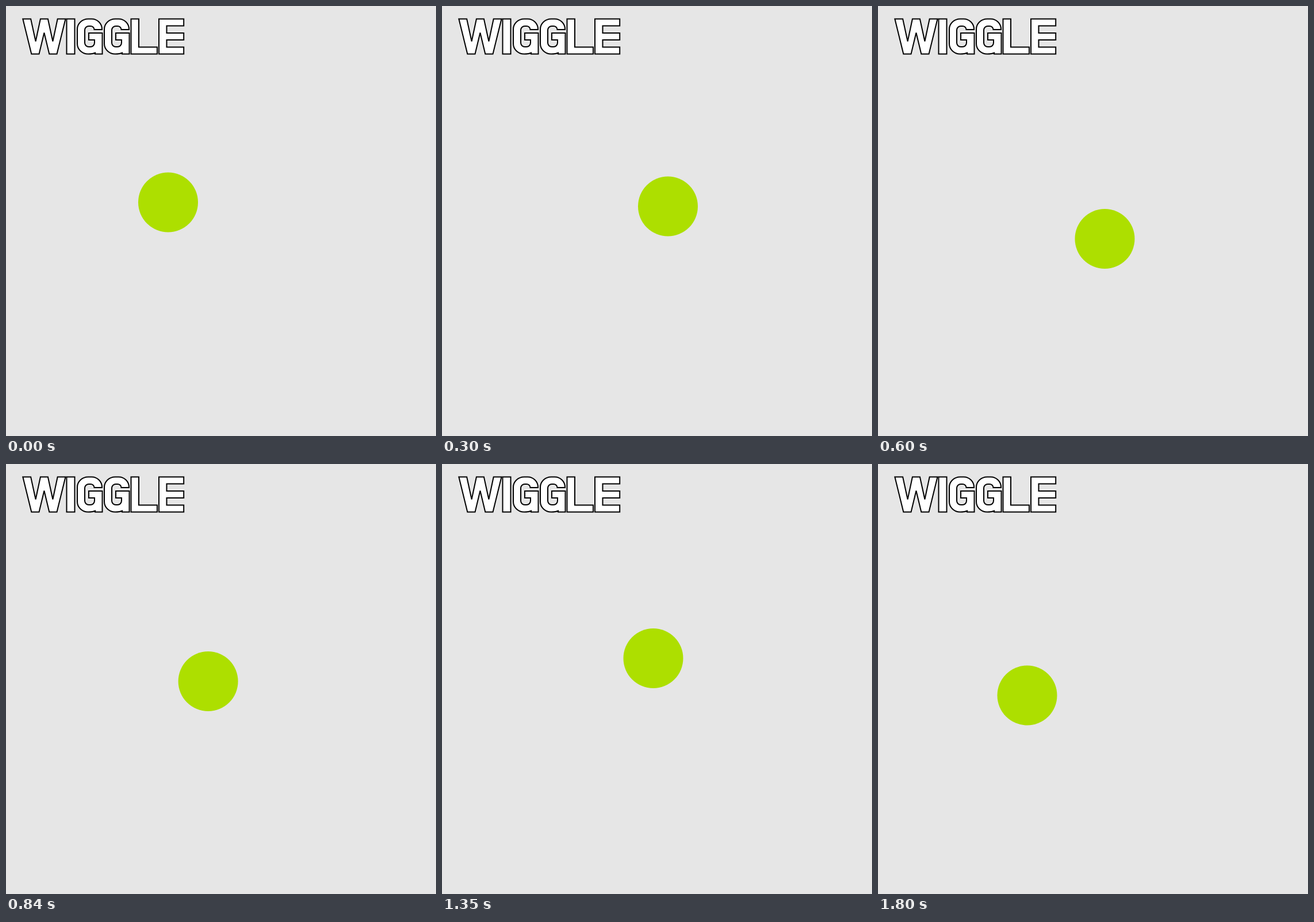
Animation, 748 px wide and 748 px high, one loop 1830 ms. Source, as an HTML page:

```html
<!DOCTYPE html>
<html lang="en">
<head>
<meta charset="utf-8">
<title>Wiggle</title>
<style>
  html, body { margin: 0; width: 100%; height: 100%; overflow: hidden; background: #e6e6e6; }
  svg { display: block; width: 100vw; height: 100vh; }
  .word { fill: #fff; stroke: #000; stroke-width: 2; }
</style>
</head>
<body>
<svg viewBox="0 0 748 748">
  <g class="word" role="img" aria-label="WIGGLE">
    <path d="M29.3 22.5h13.8l8.5 39l8.3-39h13l8.5 39l8.3-39h13.8l-15 61h-13.2l-8.9-37l-8.9 37h-13.2z"/>
    <path d="M105.5 22.5h14v61h-14z"/>
    <path id="g" d="M167 41h-13.5a6.5 6 0 0 0-6.5-6h-3a7 7 0 0 0-7 7v22a7 7 0 0 0 7 7h3a7 7 0 0 0 7-7v-5h-10v-12h23.5v36.5h-12.5v-2q-4 2-12 2a19 18 0 0 1-19-18v-25a19 18 0 0 1 19-18h6a18 18 0 0 1 18 18z"/>
    <use href="#g" x="47"/>
    <path d="M217.5 22.5h13.5v49h32v12h-45.5z"/>
    <path d="M266 22.5h43.2v12h-29.7v12.5h29.7v12h-29.7v12.5h29.7v12h-43.2z"/>
  </g>
  <circle id="ball" r="52" fill="#addf00"/>
</svg>
<script>
  const LOOP = 1830, STEP = 30, BEAT = 150;
  const ball = document.getElementById("ball");

  // Centre of the ball, one value per beat
  const xs = [282, 320, 393, 439, 394.5, 348, 362, 402, 405, 367.5, 365.8, 263.8, 259.5];
  const ys = [341.5, 331, 348.5, 345, 405, 393, 365, 322, 370, 338, 309.5, 327.2, 402.5];

  // Catmull-Rom spline through evenly spaced values
  function spline(values, t) {
    const i = Math.floor(t / BEAT), u = t / BEAT - i;
    const at = k => values[Math.min(Math.max(k, 0), values.length - 1)];
    const [a, b, c, d] = [at(i - 1), at(i), at(i + 1), at(i + 2)];
    return b + u / 2 * (c - a + u * (2 * a - 5 * b + 4 * c - d + u * (3 * (b - c) + d - a)));
  }

  const start = performance.now();

  function draw(now) {
    const t = Math.floor((Math.max(0, now - start) % LOOP) / STEP) * STEP;
    ball.setAttribute("cx", spline(xs, t));
    ball.setAttribute("cy", spline(ys, t));
    requestAnimationFrame(draw);
  }
  draw(start);
</script>
</body>
</html>
```
